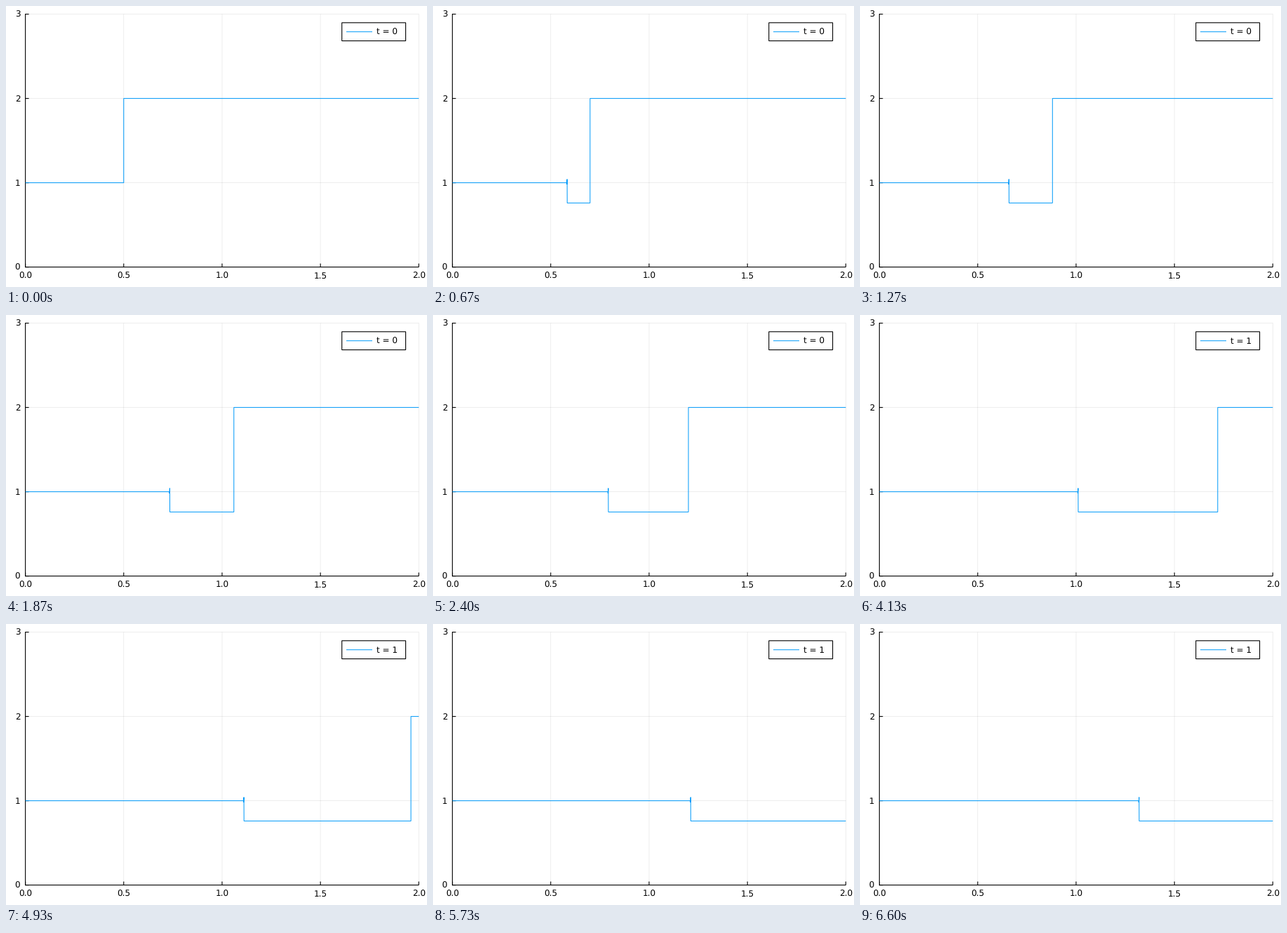
Write a matplotlib script that moves like this. It is 600x400 px and loops after 6670 ms.

```python
import matplotlib.pyplot as plt
from matplotlib.animation import FuncAnimation
from matplotlib.patches import Rectangle

W, H, DPI = 600, 400, 100
FRAMES, LOOP = 100, 6670
BLUE = "#009AFA"
X0, Y0 = 27.6, 371.6        # pixel position of the data zero
SX, SY = 280.35, 120.0      # pixels per data unit
X_MAX, Y_MAX = 2.0, 3.0
START, DT = 0.5, 0.02
SHOCK_SPEED = 0.41875       # the right front moves at speed 1
LEFT, MID, RIGHT = 1.0, 0.76, 2.0

plt.rcParams.update({"font.family": "DejaVu Sans", "text.hinting": "none",
                     "toolbar": "None"})


def pt(px):
    return px * 72 / DPI


def px(x):
    return X0 + SX * x


def py(y):
    return Y0 - SY * y


fig = plt.figure(figsize=(W / DPI, H / DPI), dpi=DPI, facecolor="white")
ax = fig.add_axes([0, 0, 1, 1])
ax.set_xlim(0, W)
ax.set_ylim(H, 0)
ax.axis("off")


def stroke(xs, ys, color="black", width=1.1, **kw):
    line, = ax.plot(xs, ys, color=color, lw=pt(width), snap=False,
                    solid_capstyle="butt", solid_joinstyle="miter", **kw)
    return line


def label(x, y, s, ha):
    return ax.text(x, y, s, fontsize=pt(12), ha=ha, va="baseline",
                   color="black", zorder=6)


def draw_axes():
    left, right, top, bottom = px(0), px(X_MAX), py(Y_MAX), py(0)
    for i in range(5):
        x = px(i / 2)
        stroke([x, x], [bottom, top], alpha=0.1, width=0.7, zorder=1)
        stroke([x, x], [bottom, bottom - 5], zorder=2)
        label(x, 387.5, f"{i / 2:.1f}", "center")
    for i in range(4):
        y = py(i)
        stroke([left, right], [y, y], alpha=0.1, width=0.7, zorder=1)
        stroke([left, left + 5], [y, y], zorder=2)
        label(20.3, y + 4.4, str(i), "right")
    stroke([left, left], [bottom + 0.5, top - 0.5], zorder=2)
    stroke([left - 0.5, right], [bottom, bottom], zorder=2)


def draw_legend():
    ax.add_patch(Rectangle((478.7, 23.8), 90.9, 25.8, fc="white", ec="black",
                           lw=pt(1.1), snap=False, joinstyle="miter", zorder=4))
    stroke([485, 522], [36.7, 36.7], BLUE, 1, zorder=5)
    return label(528, 41, "t = 0", "left")


def profile(k):
    front = START + DT * k
    pts = [(0, LEFT)]
    if k == 0:
        pts += [(START, LEFT)]
    else:
        # small dip and overshoot just behind the slow shock
        s = START + SHOCK_SPEED * DT * k
        pts += [(s - 0.003, LEFT), (s - 0.002, 0.98), (s - 0.0005, 1.042),
                (s, MID), (min(front, X_MAX), MID)]
    if front < X_MAX - 1e-9:
        pts += [(front, RIGHT), (X_MAX, RIGHT)]
    return pts


draw_axes()
time_text = draw_legend()
curve = stroke([], [], BLUE, 1, zorder=3)


def update(k):
    xs, ys = zip(*profile(k))
    curve.set_data([px(x) for x in xs], [py(y) for y in ys])
    time_text.set_text(f"t = {k // 50}")
    return curve, time_text


anim = FuncAnimation(fig, update, frames=FRAMES, interval=LOOP / FRAMES,
                     repeat=True, repeat_delay=0, blit=False)
plt.show()
```
